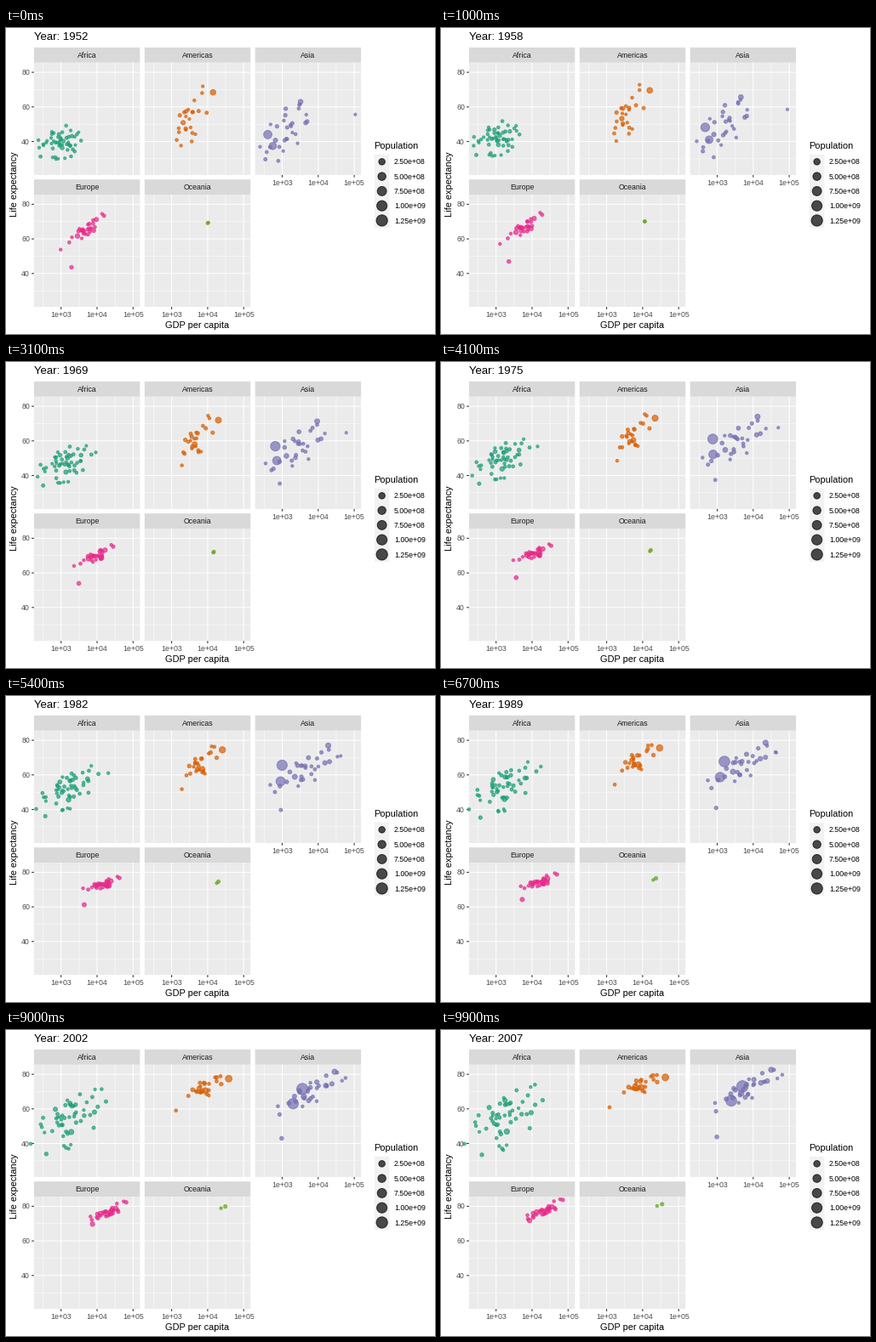
A matplotlib script that plays this animation: 504 by 360 pixels, repeating every 10000 ms.

```python
import numpy as np
import matplotlib.pyplot as plt
from matplotlib.animation import FuncAnimation
from matplotlib.patches import Rectangle

plt.rcParams["font.family"] = "Liberation Sans"
W, H, FRAMES = 504, 360, 100
KEYS = (1952, 1980, 2007)

# Panel geometry in pixels, and the data range it spans
LEFT, PITCH_X, PANEL_W = 32.9, 129.9, 124.4
TOP, PITCH_Y, PANEL_H, STRIP_H = 40.8, 155.3, 132.1, 17.9
X_MIN, X_MAX, Y_MIN, Y_MAX = 2.2487, 5.1887, 20.65, 85.55


def blend(year, keys):
    """Linear path through one row of values per key year."""
    return [np.interp(year, KEYS, column) for column in zip(*keys)]


class Cloud:
    """Seeded countries; each key holds mean and spread of log GDP,
    mean and spread of life expectancy, and their correlation."""

    def __init__(self, n, seed, pop, growth, *keys):
        rng = np.random.default_rng(seed)
        z = rng.normal(size=(5, n))
        z = (z - z.mean(1, keepdims=True)) / z.std(1, keepdims=True)
        z = np.clip(z, -2.1, 2.1)
        self.start, self.end = z[:2], z[2:4]
        self.pop, self.growth, self.keys = pop * np.exp(z[4]), growth, keys

    def at(self, year):
        u = (year - KEYS[0]) / (KEYS[-1] - KEYS[0])
        turn = 0.6 * u  # countries slowly trade places
        a, b = np.cos(turn) * self.start + np.sin(turn) * self.end
        mx, sx, my, sy, r = blend(year, self.keys)
        x = mx + sx * a
        y = my + sy * (r * a + np.sqrt(1 - r * r) * b)
        return x, y, self.pop * (1 + (self.growth - 1) * u)


class Landmark:
    """One prominent country; each key holds log GDP, life, population."""

    def __init__(self, *keys):
        self.keys = keys

    def at(self, year):
        return [np.array([v]) for v in blend(year, self.keys)]


class Region:
    def __init__(self, name, color, cell, *parts):
        self.name, self.color, self.cell, self.parts = name, color, cell, parts

    def at(self, year):
        return [np.concatenate(v) for v in zip(*(p.at(year) for p in self.parts))]


REGIONS = [
    Region("Africa", "#1B9E77", (0, 0),
           Cloud(50, 11, 3, 3, (2.98, .29, 39.1, 5.0, .35),
                 (3.18, .36, 51.5, 6.8, .65), (3.22, .44, 54.8, 9.4, .5)),
           Landmark((3.38, 42.7, 1), (4.33, 60, 3), (4.08, 74, 6)),
           Landmark((3.03, 36.3, 33), (3.2, 45.5, 72), (3.3, 46.9, 135))),
    Region("Americas", "#D95F02", (1, 0),
           Cloud(22, 4, 5, 2.3, (3.51, .22, 53.3, 8.2, .55),
                 (3.79, .22, 66, 5.2, .65), (3.96, .25, 74, 3.2, .6)),
           Landmark((3.32, 50.9, 57), (3.84, 62.6, 123), (3.96, 72.4, 190)),
           Landmark((3.26, 37.6, 3), (3.3, 51, 5), (3.08, 60.9, 9)),
           Landmark((4.15, 68.4, 158), (4.39, 74.2, 227), (4.63, 78.2, 301))),
    Region("Asia", "#7570B3", (2, 0),
           Cloud(28, 8, 8, 2.6, (3.12, .35, 46.5, 8.3, .6),
                 (3.62, .46, 62, 6.2, .75), (3.83, .46, 71.5, 5.8, .85)),
           Landmark((2.89, 28.8, 8), (2.96, 39.4, 13), (2.99, 43.8, 32)),
           Landmark((2.6, 44, 556), (2.94, 65, 970), (3.7, 73, 1319)),
           Landmark((2.74, 37.4, 372), (2.92, 55.6, 680), (3.39, 64.7, 1110)),
           Landmark((3.51, 63, 86), (4.26, 76.5, 117), (4.5, 82.6, 127)),
           Landmark((5.03, 55.6, 1), (4.62, 70.4, 1), (4.67, 77.6, 3))),
    Region("Europe", "#E7298A", (0, 1),
           Cloud(28, 2, 9, 1.3, (3.71, .23, 65.6, 4.2, .88),
                 (4.17, .19, 72.7, 1.8, .75), (4.36, .22, 77.6, 2.7, .88)),
           Landmark((2.99, 53.8, 3), (3.59, 70.4, 4), (3.87, 74.9, 5)),
           Landmark((3.29, 43.6, 22), (3.62, 60.4, 45), (3.93, 71.8, 71))),
    Region("Oceania", "#66A61E", (1, 1),
           Landmark((4.0, 69.1, 9), (4.28, 74.1, 15), (4.54, 81.2, 20)),
           Landmark((4.02, 69.4, 2), (4.24, 73.2, 3), (4.4, 80.2, 4))),
]


def corner(cell):
    return LEFT + PITCH_X * cell[0], TOP + PITCH_Y * cell[1]


def to_px(cell, x, y):
    x0, y0 = corner(cell)
    return (x0 + (x - X_MIN) / (X_MAX - X_MIN) * PANEL_W,
            y0 + (Y_MAX - y) / (Y_MAX - Y_MIN) * PANEL_H)


def areas(pop):
    """Marker areas for populations in millions."""
    size = 1 + 5 * np.sqrt(pop / 1318.7)
    return (0.75 * (size * 2.845 + 0.945)) ** 2


fig = plt.figure(figsize=(W / 72, H / 72), dpi=72, facecolor="white")
ax = fig.add_axes([0, 0, 1, 1])
ax.set(xlim=(0, W), ylim=(H, 0))
ax.axis("off")


def rect(x, y, w, h, color):
    ax.add_patch(Rectangle((x, y), w, h, fc=color, lw=0, zorder=1, snap=False))


def line(xs, ys, lw, color="white"):
    ax.plot(xs, ys, color=color, lw=lw, zorder=2, snap=False,
            solid_capstyle="butt")


def label(x, y, s, size=8.8, color="black", ha="left", **kw):
    return ax.text(x, y, s, fontsize=size, color=color, ha=ha, va="baseline", **kw)


def dots(color):
    return ax.scatter([], [], color=color, alpha=0.7, linewidths=1, zorder=3)


def draw_grid(cell, xs, ys, lw):
    x0, y0 = corner(cell)
    for gx in xs:
        px = to_px(cell, gx, 0)[0]
        line([px, px], [y0, y0 + PANEL_H], lw)
    for gy in ys:
        py = to_px(cell, 0, gy)[1]
        line([x0, x0 + PANEL_W], [py, py], lw)


def draw_panel(region):
    cell = region.cell
    x0, y0 = corner(cell)
    y1 = y0 + PANEL_H
    rect(x0, y0 - STRIP_H, PANEL_W, STRIP_H, "#D9D9D9")
    rect(x0, y0, PANEL_W, PANEL_H, "#EBEBEB")
    label(x0 + PANEL_W / 2, y0 - 5.8, region.name, color="#1A1A1A", ha="center")
    draw_grid(cell, (2.5, 3.5, 4.5), (30, 50, 70), 0.53)
    draw_grid(cell, (3, 4, 5), (40, 60, 80), 1.07)
    if cell[0] == 0:
        for gy in (40, 60, 80):
            py = to_px(cell, 0, gy)[1]
            line([x0 - 2.75, x0], [py, py], 1.07, "#333333")
            label(x0 - 4.9, py + 3.1, str(gy), color="#4D4D4D", ha="right")
    if cell[1] == 1 or cell[0] == 2:
        for gx in (3, 4, 5):
            px = to_px(cell, gx, 0)[0]
            line([px, px], [y1, y1 + 2.75], 1.07, "#333333")
            label(px, y1 + 12, f"1e+0{gx}", color="#4D4D4D", ha="center")


def draw_legend():
    key, x0, y0 = 17.28, 433, 148.7
    label(x0 - 0.5, 142, "Population", 11)
    rect(x0, y0, key, 5 * key, "#F2F2F2")
    pops = np.arange(250, 1251, 250)
    ys = y0 + key * (np.arange(5) + 0.5)
    marks = dots("black")
    marks.set_offsets(np.c_[np.full(5, x0 + key / 2), ys])
    marks.set_sizes(areas(pops))
    for p, y in zip(pops, ys):
        label(456, y + 3.1, f"{p * 1e6:.2e}")


for reg in REGIONS:
    draw_panel(reg)
draw_legend()
label(225, 353, "GDP per capita", 11, ha="center")
label(13.3, 184.1, "Life expectancy", 11, ha="center", rotation=90,
      rotation_mode="anchor")
title = label(32.9, 14.3, "", 13.2)
marks = [dots(reg.color) for reg in REGIONS]


def update(frame):
    year = KEYS[0] + (KEYS[-1] - KEYS[0]) * frame / (FRAMES - 1)
    title.set_text(f"Year: {year:.0f}")
    for reg, mark in zip(REGIONS, marks):
        x, y, pop = reg.at(year)
        mark.set_offsets(np.column_stack(to_px(reg.cell, x, y)))
        mark.set_sizes(areas(pop))
    return [title, *marks]


anim = FuncAnimation(fig, update, frames=FRAMES, interval=100, repeat=True,
                     repeat_delay=0, blit=False)
plt.show()
```
